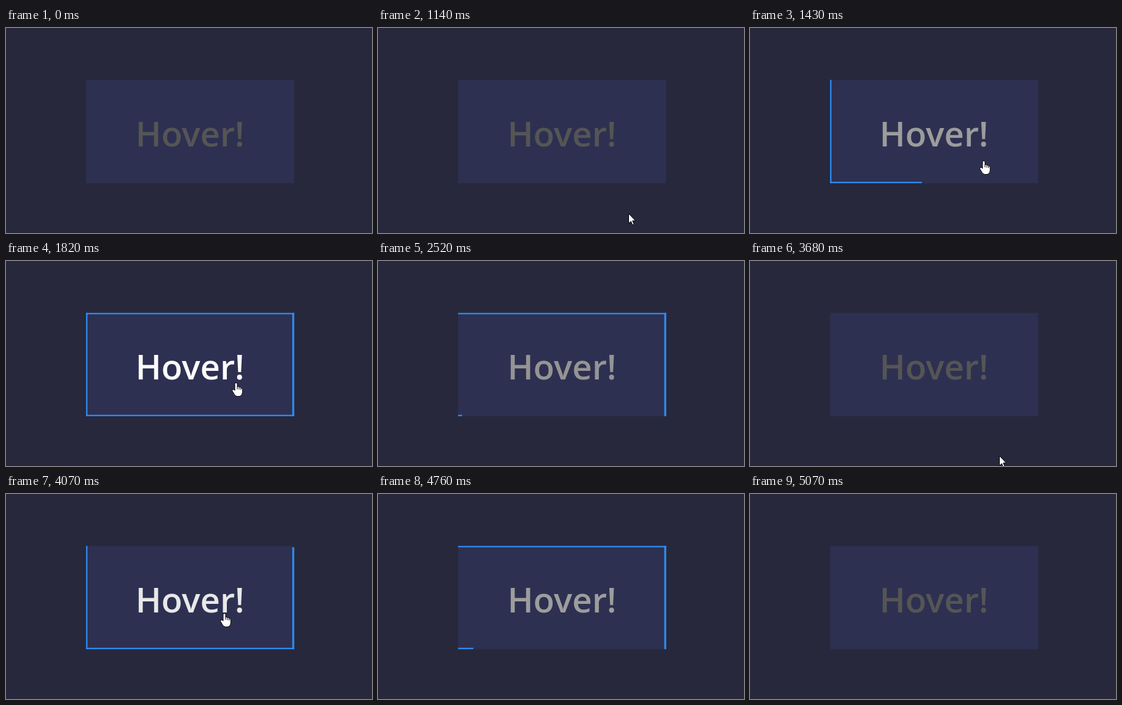
Recreate the animation shown at these times as an HTML page. Size 595 by 334 pixels, loop 5.77 s.

```html
<!DOCTYPE html>
<html lang="en">
<head>
<meta charset="utf-8">
<title>Hover border</title>
<style>
  html, body { margin: 0; width: 100%; height: 100%; overflow: hidden; background: #27283c; }
  svg { display: block; }
  text { font: 600 56px "Open Sans", "Noto Sans", sans-serif; text-anchor: middle; }
  .side { fill: #2e90f5; }
  .cursor path { fill: #fff; stroke: #000; stroke-linejoin: round; }
</style>
</head>
<body>
<svg width="595" height="334" viewBox="0 0 595 334">
  <rect id="box" fill="#2e3052"/>
  <text id="label" x="299" y="192.6">Hover!</text>
  <rect id="left" class="side"/>
  <rect id="bottom" class="side"/>
  <rect id="right" class="side"/>
  <rect id="top" class="side"/>
  <g id="arrow" class="cursor">
    <path d="M.5 .5V16.5L4.2 13L6.8 18.8L9.2 17.8L6.7 12H11.5Z"/>
  </g>
  <g id="hand" class="cursor">
    <path d="M-2 2Q0 -1.4 2 2V7Q4 5.6 5 7.6Q7 6.6 7.8 8.8Q10.4 8.2 10.4 11V15.5Q10 22.4 4 22.6H2Q-1.4 22.4 -3 19L-6.2 13.6Q-6.8 10.4 -3.8 11.2L-2 13Z"/>
    <path d="M2 7V11M5 8V11.5M7.8 9V12" fill="none"/>
  </g>
</svg>
<script>
const LOOP = 5770, STEP = 77.5;
const SIDE_MS = 100, TEXT_MS = 500, ARRIVE_MS = 520, DEPART_MS = 155;
const BOX = { x: 130.2, y: 84.6, width: 338.3, height: 168.2 };
const THIN = 2.2, THICK = 3.1;
const $ = id => document.getElementById(id);

// Two pointer visits; the second one vanishes without moving away.
const visits = [
  { appear: 1140, enter: 1246, depart: 2200, leave: 2328, gone: 2430,
    from: [407, 302], rest: [374, 198], to: [388, 288] },
  { appear: 3680, enter: 3783, depart: 4600, leave: 4588, gone: 4600,
    from: [405, 317], rest: [354, 192], to: [354, 192] }
];

// The picture refreshes in steps during these spans and holds in between.
const bursts = [[1140, 1660], [2200, 2750], [3680, 4310], [4600, 5070]];

function snap(t) {
  const burst = bursts.findLast(b => b[0] <= t);
  if (!burst) return 0;
  const [start, end] = burst;
  return t >= end ? end : start + Math.floor((t - start) / STEP) * STEP;
}

const clamp = v => Math.min(1, Math.max(0, v));
const mix = (a, b, k) => a.map((v, i) => v + (b[i] - v) * k);

// CSS "ease": cubic-bezier(.25, .1, .25, 1)
function ease(x) {
  x = clamp(x);
  if (x === 0 || x === 1) return x;
  const bez = (s, a, b) => 3 * s * (1 - s) ** 2 * a + 3 * s * s * (1 - s) * b + s ** 3;
  let lo = 0, hi = 1;
  for (let i = 0; i < 24; i++) {
    const mid = (lo + hi) / 2;
    if (bez(mid, .25, .25) < x) lo = mid; else hi = mid;
  }
  return bez(lo, .1, 1);
}

function hoverAmount(t, duration, delay) {
  const v = visits.findLast(v => v.enter <= t);
  if (!v) return 0;
  return t < v.leave
    ? ease((t - v.enter - delay) / duration)
    : 1 - ease((t - v.leave - delay) / duration);
}

// Slows down on the way in, speeds up on the way out.
function pointerAt(t) {
  const v = visits.find(v => t >= v.appear && t < v.gone);
  if (!v) return null;
  return t < v.depart
    ? mix(v.from, v.rest, 1 - (1 - clamp((t - v.appear) / ARRIVE_MS)) ** 3)
    : mix(v.rest, v.to, clamp((t - v.depart) / DEPART_MS) ** 3);
}

function setRect(id, attrs) {
  for (const name in attrs) $(id).setAttribute(name, attrs[name]);
}

function draw(t) {
  const { x, y, width, height } = BOX;
  const [l, b, r, u] = [0, 1, 2, 3].map(i => hoverAmount(t, SIDE_MS, i * SIDE_MS));
  setRect("left", { x, y, width: THIN, height: height * l });
  setRect("bottom", { x, y: y + height - THIN, width: width * b, height: THIN });
  setRect("right", { x: x + width - THICK, y: y + height * (1 - r), width: THICK, height: height * r });
  setRect("top", { x: x + width * (1 - u), y, width: width * u, height: THIN });

  const grey = Math.round(85 + 170 * hoverAmount(t, TEXT_MS, 0));
  $("label").setAttribute("fill", `rgb(${grey},${grey},${grey})`);

  const p = pointerAt(t);
  const shape = p && (p[1] < y + height ? "hand" : "arrow");
  for (const id of ["arrow", "hand"]) $(id).style.display = id === shape ? "" : "none";
  if (p) $(shape).setAttribute("transform", `translate(${p.map(Math.round).join(" ")})`);
}

setRect("box", BOX);
const start = performance.now();
function frame() {
  draw(snap((performance.now() - start) % LOOP));
  requestAnimationFrame(frame);
}
frame();
</script>
</body>
</html>
```
